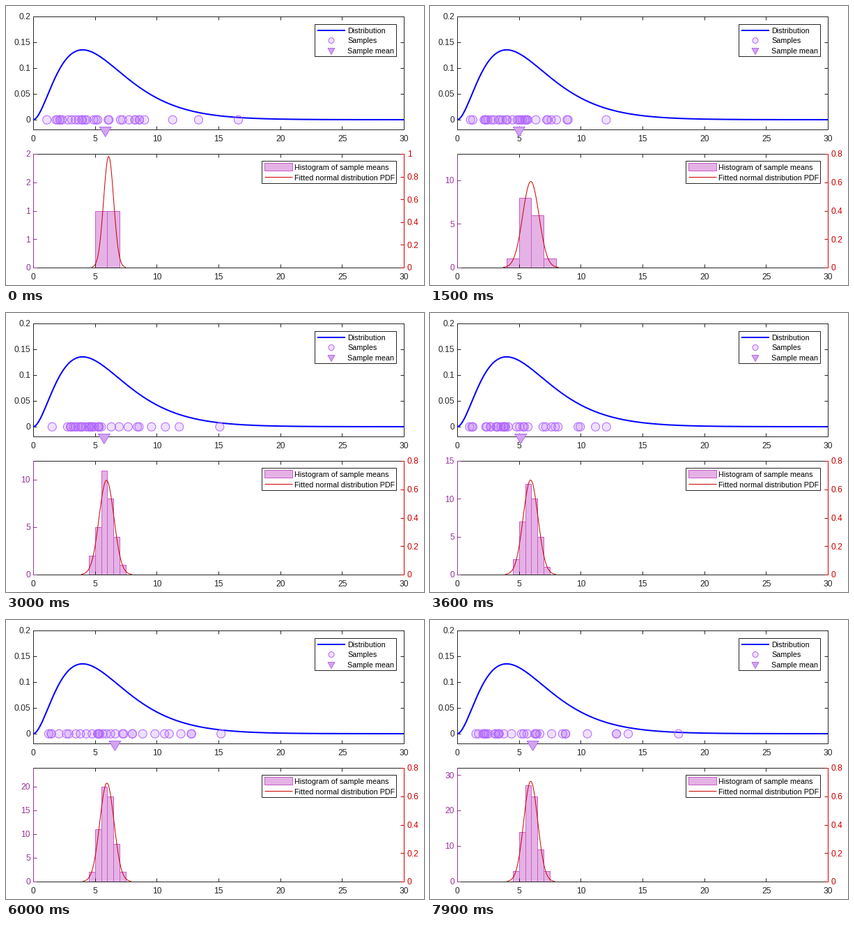
Animation of 600x400 px, one loop 8 s. Source, as a matplotlib script:

```python
import math

import matplotlib.pyplot as plt
import numpy as np
from matplotlib.animation import FuncAnimation
from matplotlib.colors import to_rgba
from matplotlib.patches import Circle, Polygon, Rectangle

W, H, FRAMES, INTERVAL = 600, 400, 80, 100
LEFT, RIGHT = 39, 571
TOP1, BASE1 = 15, 177
TOP2, BASE2 = 212, 375

INK = "#262626"
BLUE = "#0000ff"
PURPLE = "#993399"
BAR = "#bf40bf"
BAR_EDGE = "#c95fc9"
RED = "#cc0000"
DOT = "#b266ff"

plt.rcParams["font.family"] = "Liberation Sans"
fig = plt.figure(figsize=(W / 100, H / 100), dpi=100, facecolor="white")
ax = fig.add_axes([0, 0, 1, 1])
ax.set(xlim=(0, W), ylim=(H, 0))
ax.axis("off")


def px(v):
    return LEFT + np.asarray(v) * (RIGHT - LEFT) / 30


def py(v):
    return 163 - np.asarray(v) * 740


def line(xs, ys, color=INK, width=1.0, z=5):
    return ax.plot(xs, ys, color=color, lw=width * 0.72, zorder=z,
                   solid_capstyle="butt")[0]


def label(x, y, text, color=INK, size=12, ha="left", z=6):
    return ax.text(x, y + 0.36 * size, text, color=color, ha=ha, zorder=z,
                   fontsize=size * 0.72, va="baseline")


def box(x0, y0, x1, y1, face, edge, z):
    return ax.add_patch(Rectangle((x0, y0), x1 - x0, y1 - y0, lw=0.72,
                                  fc=face, ec=edge, zorder=z))


def bar(x0, y0, x1, y1, z):
    return box(x0, y0, x1, y1, to_rgba(BAR, 0.4), BAR_EDGE, z)


def dot(x, y, r, z=7):
    return ax.add_patch(Circle((x, y), r, lw=0.72, ec=DOT, zorder=z,
                               fc=to_rgba(DOT, 0.2)))


def triangle(x, top, half, height, z=8):
    return ax.add_patch(Polygon(
        [(x - half, top), (x + half, top), (x, top + height)],
        lw=0.72, ec="#b470e6", fc="#d1a3f0", zorder=z))


def x_axis(top, base):
    line([LEFT, RIGHT], [base, base])
    line([LEFT, RIGHT], [top, top])
    for v in range(0, 31, 5):
        x = px(v)
        line([x, x], [base, base - 5])
        line([x, x], [top, top + 5])
        label(x + 0.3, base + 13, str(v), ha="center")


def draw_static():
    x_axis(TOP1, BASE1)
    x_axis(TOP2, BASE2)
    for x, d in ((LEFT, 5), (RIGHT, -5)):
        line([x, x], [TOP1, BASE1])
        for v in (0, 0.05, 0.1, 0.15, 0.2):
            line([x, x + d], [py(v), py(v)])
            if x == LEFT:
                label(35, py(v), f"{v:g}", ha="right")
    line([LEFT, LEFT], [TOP2, BASE2], PURPLE)
    line([RIGHT, RIGHT], [TOP2, BASE2], RED)

    # gamma density, shape 3 and scale 2
    v = np.linspace(0, 30, 400)
    line(px(v), py(v ** 2 * np.exp(-v / 2) / 16), BLUE, 2, 6)

    box(443, 26, 560, 72, "white", INK, 9)
    line([447, 487], [35, 35], BLUE, 2, 10)
    dot(467, 49.5, 4, 10)
    triangle(467, 60.5, 5, 9, 10)
    for y, text in ((35, "Distribution"), (49.5, "Samples"), (64, "Sample mean")):
        label(490, y, text, "black", 10.8, z=10)

    box(367, 222, 560, 254, "white", INK, 9)
    bar(371, 225, 411, 236, 10)
    line([371, 411], [245, 245], RED, 1, 10)
    label(414, 230.7, "Histogram of sample means", "black", 10.8, z=10)
    label(414, 245.7, "Fitted normal distribution PDF", "black", 10.8, z=10)


def build_means():
    """Evenly scattered, slightly skewed means; the early ones spread wider."""
    k = np.arange(FRAMES)
    u = (0.8 + k * (math.sqrt(5) - 1) / 2) % 1
    z = 4.91 * (u ** 0.14 - (1 - u) ** 0.14)  # normal quantile
    spread = 0.089 * (1 + 0.33 * np.exp(-((k - 14) / 8) ** 2))
    return 5.93 * np.exp(spread * z)


MEANS = build_means()


def samples(n):
    """Thirty gamma draws whose average is the n-th mean."""
    v = np.random.default_rng(100 + n).gamma(3, 2, 30)
    v = np.where(v > 20, v / 2, v)
    return v * MEANS[n - 1] / v.mean()


def bin_width(n, sd):
    """Scott's rule rounded to a tidy width."""
    return 1 if 3.5 * sd / n ** (1 / 3) >= 0.75 else 0.5


def tick_step(top):
    return next(s for s in (0.5, 1, 2, 5, 10) if top / s <= 5)


live = []


def update(i):
    while live:
        live.pop().remove()
    n = i + 2 if i < 3 else i + 1
    mu, sd = MEANS[:n].mean(), MEANS[:n].std(ddof=1)

    for x in px(samples(n)):
        live.append(dot(x, 163.2, 6))
    live.append(triangle(px(MEANS[n - 1]) + 0.5, 173.5, 8.5, 14))

    # both scales agree, so the density fits the bars
    width = bin_width(n, sd)
    peak = 1 / (sd * math.sqrt(2 * math.pi))
    steps = math.ceil(peak / 0.2)
    top = round(0.2 * steps * n * width)
    span = BASE2 - TOP2

    counts, edges = np.histogram(MEANS[:n], np.arange(4, 9.01, width))
    for c, e in zip(counts, edges):
        if c:
            y = max(BASE2 - span * c / top, TOP2)
            live.append(bar(px(e), y, px(e + width), BASE2, 2))

    z = np.linspace(-3.4, 3.4, 120)
    pdf = peak * np.exp(-z * z / 2)
    live.append(line(px(mu + sd * z), BASE2 - span * pdf / (0.2 * steps), RED, 1, 4))

    for t in np.arange(0, top + 1e-6, tick_step(top)):
        y = BASE2 - span * t / top
        live.append(line([LEFT, LEFT + 5], [y, y], PURPLE))
        live.append(label(35, y, str(int(t + 0.5)), PURPLE, ha="right"))
    for k in range(steps + 1):
        y = BASE2 - span * k / steps
        live.append(line([RIGHT - 5, RIGHT], [y, y], RED))
        live.append(label(576, y, f"{0.2 * k:g}", RED))
    return live


draw_static()
anim = FuncAnimation(fig, update, frames=FRAMES, interval=INTERVAL,
                     repeat=True, repeat_delay=0, blit=False)
plt.show()
```
